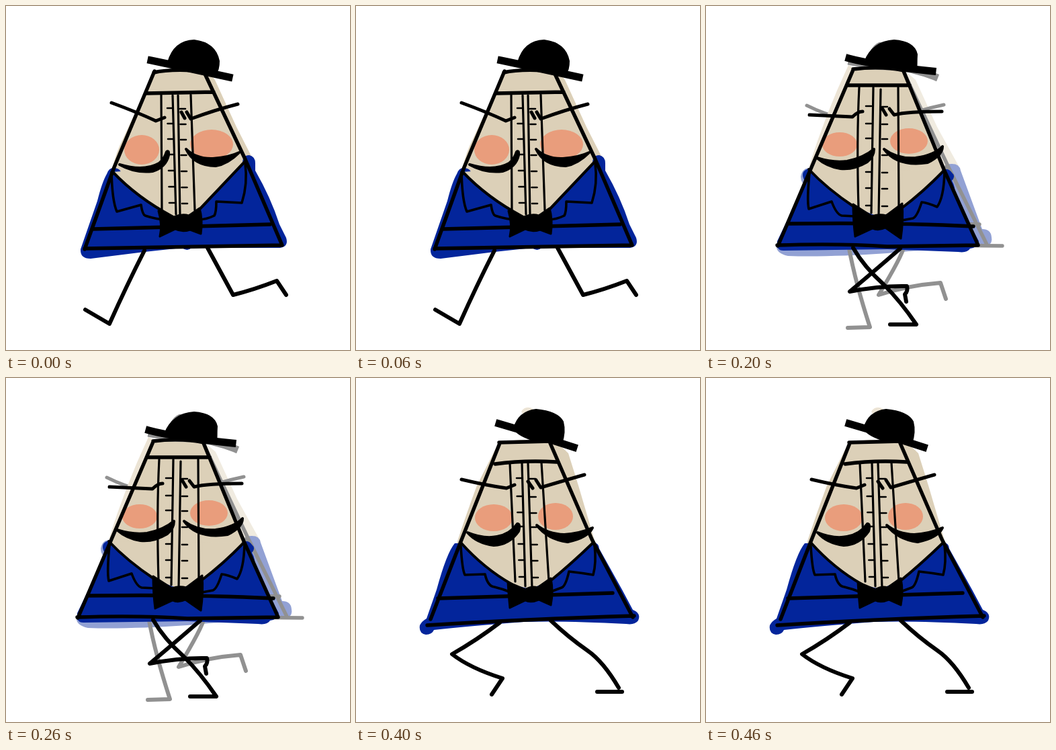
Recreate the animation shown at these times as an HTML page. Size 512x512 px, loop 0.5 s.

```html
<!DOCTYPE html>
<html lang="en">
<head>
<meta charset="utf-8">
<title>Running metronome</title>
<style>
html, body { margin: 0; width: 100%; height: 100%; overflow: hidden; background: #fff; }
svg { display: block; width: 100vw; height: 100vh; }
path { stroke-linecap: round; stroke-linejoin: round; }
</style>
</head>
<body>
<svg id="stage" viewBox="0 0 512 512"></svg>
<script>
const SKIN = '#dcd0b8', COAT = '#03259b', BLUSH = '#e99d7c', INK = '#000';
const STEP = 100;

// ticks: left x, right x, drift of the columns from top to bottom
const poses = [
  {
    skin: 'M220 99L272 94L303 100L311 110L343 180L366 225L352 240L280 314L235 308L158 242Q165 215 174 198Z',
    coat: 'M160 241Q173 241 173 256L240 285L285 285L352 234Q352 222 362 222Q371 224 371 234V245Q394 285 407 325L417 345Q421 358 408 360H276Q270 366 262 360L206 366L126 376Q110 376 111 362L136 290Q143 262 150 250Q153 241 160 241Z',
    cheeks: [[202, 214, 26, 22], [306, 206, 32, 22]],
    frame: 'M221 97L161 240L117 362M220 99Q245 93 296 97M296 101L356 228L411 356M117 361L411 356M208 130L309 128M129 332Q260 328 393 325',
    scale: 'M231 131L232 305M248 133L253 310M256 133L259 312M275 132L281 304',
    ticks: [240, 258, 3], tickY: [153, 176, 199, 222, 246, 270, 294],
    neck: 'M159 247Q195 285 247 313 M282 309Q317 272 355 232',
    lapels: 'M157 247Q158 290 165 306L201 296Q203 310 207 312Q225 318 240 318M356 234Q360 265 351 293L313 291Q313 307 310 312Q298 318 285 318',
    bow: 'M227 305L250 314Q262 309 272 312L288 301Q293 318 290 339L274 333Q262 337 252 332L229 343Q233 325 227 305Z',
    tache: 'M169 236Q205 247 228 234Q236 227 239 217Q243 214 242 222Q238 240 218 246Q192 249 169 236ZM268 213Q283 228 308 227Q333 225 347 218Q330 235 312 238Q280 238 268 213Z',
    brows: 'M157 144Q195 158 223 171L236 166M345 146Q310 155 275 168L269 158M261 158L266 167',
    brim: 'M216 81L240 86L332 106',
    dome: 'M241 84Q250 52 280 51Q312 55 317 82Q317 95 312 101L241 84Z',
    legs: 'M206 364Q180 415 154 473L118 452M300 360L338 430Q370 422 403 409L417 430'
  },
  {
    skin: 'M220 98L230 90L297 97L312 110L344 180L376 238L340 270L280 312L240 312L160 242L180 190Z',
    coat: 'M155 241Q170 243 172 255L240 285L290 285L358 236Q377 232 379 245L411 332Q424 332 425 344Q427 353 419 357Q330 362 270 368Q180 374 122 372Q104 368 105 357Q108 345 125 320L150 268Q141 264 141 254Q143 241 155 241Z',
    cheeks: [[199, 216, 25, 20], [308, 205, 29, 21]],
    frame: 'M220 101L160 241L111 356M218 98L270 94L296 97M295 100L360 238L418 355M111 356Q250 354 441 357M212 125L296 124M130 324Q270 322 407 325',
    scale: 'M230 126Q226 200 231 300M249 126L250 310M261 126Q262 220 260 312M284 124Q287 200 286 300',
    ticks: [238, 263, 2], tickY: [152, 177, 200, 222, 246, 273, 295],
    neck: 'M157 243Q185 270 228 303 M289 303Q335 270 358 238',
    lapels: 'M157 246Q152 290 154 303Q160 308 170 306Q185 295 199 293Q202 312 210 315L224 318M358 240Q354 290 349 293Q325 290 308 296Q308 305 303 312L290 318',
    bow: 'M221 298L245 313Q258 309 272 311L294 299Q296 320 292 345L273 330Q258 335 247 332L223 344Q222 320 221 298Z',
    tache: 'M166 235Q190 242 211 239Q230 232 246 214Q247 226 238 235Q215 252 195 250Q178 245 166 235ZM270 213Q290 228 313 228Q335 226 348 220Q340 234 318 239Q287 239 270 213Z',
    brows: 'M150 148Q178 162 203 167L214 177Q222 175 224 170L232 165M354 147Q315 155 280 170L273 160M261 163L268 172',
    brim: 'M217 83Q245 88 270 88Q310 93 340 105',
    dome: 'M241 90Q242 62 258 55Q282 52 300 58Q315 67 314 92Z',
    legs: 'M213 361Q222 410 244 478L211 479M295 357Q292 372 257 430Q300 416 349 412L357 436'
  },
  {
    glow: 'M212 88L220 92L165 226L153 240Q178 160 212 88Z',
    skin: 'M220 94L292 96L352 242L290 308L240 310L157 242Z',
    coat: 'M150 243Q163 243 165 250L225 285L290 285L352 245Q360 240 366 248Q372 253 366 260Q372 270 370 283L406 350Q404 360 393 361Q389 368 375 366L270 362L115 364Q104 364 106 350L148 262Q139 248 150 243Z',
    cheeks: [[199, 206, 26, 18], [302, 201, 28, 19]],
    frame: 'M219 95L157 240L107 357M219 94Q260 89 295 96M294 97L354 243L405 356M106 356Q200 353 270 358L405 356M210 118H303M124 324Q280 322 398 328',
    scale: 'M228 121Q224 200 227 300M249 121L246 308M260 124L257 312M286 121L287 300',
    ticks: [238, 261, 0], tickY: [150, 176, 198, 222, 248, 272, 298],
    neck: 'M153 243Q180 272 222 300 M291 301Q323 277 354 245',
    lapels: 'M154 248Q150 290 153 302L187 291Q194 310 202 312L222 313M355 247Q354 285 344 299Q330 293 321 292Q314 314 308 316L292 319',
    bow: 'M219 295L247 313Q258 309 268 312L292 294Q294 318 290 346L267 330Q256 335 248 331L222 343Q219 320 219 295Z',
    tache: 'M165 226Q190 234 210 231Q235 226 250 213Q250 224 240 232Q220 244 200 242Q180 239 165 226ZM265 213Q285 228 312 226Q340 222 352 209Q352 222 330 233Q285 240 265 213Z',
    brows: 'M154 162L218 165Q226 157 233 157M351 157Q300 157 280 162L273 153M262 152L268 162',
    brim: 'M213 78Q250 88 337 97',
    dome: 'M236 83Q248 53 280 51Q310 53 314 72L313 92Z',
    legs: 'M219 360Q235 388 265 415Q290 440 313 474H274M289 361Q250 395 214 425Q260 416 299 417Q301 424 296 429L298 440'
  },
  {
    skin: 'M213 94L270 86L300 100L345 180L371 240L340 262L285 310L235 305L160 262L130 292Q140 245 160 205Z',
    coat: 'M152 248L165 250L235 285L290 285L358 238Q375 238 379 248L416 330Q427 335 425 346Q422 352 412 351L340 354Q328 361 318 356L267 357Q240 364 215 360L190 354L112 356Q105 345 113 338L122 336L148 272Z',
    cheeks: [[209, 209, 25, 20], [303, 198, 23, 19]],
    frame: 'M218 102L155 250L113 351M219 101L286 94M288 96Q345 215 428 363M108 354Q230 356 300 354L421 350M209 123L297 120M122 327Q250 319 362 323L408 325',
    scale: 'M229 124L231 300M247 122L252 308M258 122Q266 220 268 308M279 122Q284 200 281 302',
    ticks: [236, 257, 6], tickY: [152, 177, 201, 226, 250, 274, 294],
    neck: 'M160 246Q195 282 225 300 M296 298Q330 272 357 238',
    lapels: 'M153 252Q148 285 155 299Q165 303 176 298L204 289Q203 312 208 316L222 317M358 240Q362 265 356 294L308 295Q309 308 302 313',
    bow: 'M220 296L249 314Q258 309 268 311L297 295Q297 318 293 341L268 329Q256 334 247 331L227 342Q218 325 220 296Z',
    tache: 'M170 237Q195 242 219 237Q238 230 244 216Q248 220 243 230Q228 250 208 249Q185 246 170 237ZM271 213Q295 225 318 223Q340 217 352 205Q352 216 340 226Q325 238 308 236Q282 230 271 213Z',
    brows: 'M143 144Q190 164 226 172L236 162M352 146Q315 155 280 168Q276 164 271 155M262 162L268 172L272 168',
    brim: 'M214 64L240 73L328 109',
    dome: 'M240 76Q245 48 262 42Q280 38 300 48Q316 58 311 90Q305 98 292 95Z',
    legs: 'M291 357Q250 400 192 472V477M168 461L192 475M168 463L190 476M214 357L251 405L264 427Q310 397 328 386L344 404'
  },
  {
    glow: 'M246 50Q252 40 264 46L250 56Z',
    skin: 'M213 95L245 92L300 97L316 112L331 160L356 245L290 312L235 310L150 246Q165 200 180 160Z',
    coat: 'M152 246L160 250L235 285L290 285L350 246Q361 243 362 254L396 315L412 345Q425 350 420 361Q415 368 402 366Q310 361 250 363Q170 369 116 375Q113 382 104 382Q93 380 95 368Q98 362 105 358L120 315Q135 260 147 246Z',
    cheeks: [[205, 208, 28, 20], [297, 206, 26, 20]],
    frame: 'M214 97L155 246L111 359M213 96L290 94M289 97L351 240L412 356M106 368Q250 359 414 354M207 128Q250 122 299 125M122 328L382 320',
    scale: 'M229 127L237 303M247 127L252 310M256 127L262 312M276 126L287 302',
    ticks: [239, 258, 4], tickY: [150, 177, 201, 222, 248, 272, 297],
    neck: 'M157 246Q190 283 232 307 M288 303Q321 276 352 246',
    lapels: 'M156 250Q158 285 162 293L192 292Q196 310 206 311Q218 314 228 318M355 248Q358 275 353 293Q335 290 317 288Q312 310 306 312L290 318',
    bow: 'M226 304L252 315Q262 309 270 312L290 298Q294 318 290 338L272 330Q260 335 252 331L229 342Q227 322 226 304Z',
    tache: 'M166 230Q190 240 210 236Q230 232 240 217Q245 217 242 228Q228 248 205 249Q180 246 166 230ZM269 219Q285 232 310 233Q335 231 352 223Q345 238 315 244Q285 240 269 219Z',
    brows: 'M157 151Q195 160 224 164L236 159M340 144Q305 154 275 163L268 152M256 154L263 164',
    brim: 'M213 68L240 76L324 103',
    dome: 'M235 75Q242 50 268 47Q300 50 308 65Q312 80 306 98L262 92Q240 85 235 75Z',
    legs: 'M214 364Q180 390 143 411Q170 432 218 447L202 471M290 361Q315 385 345 406Q368 422 391 461M359 467H396'
  }
];

function add(parent, tag, attrs = {}) {
  const el = document.createElementNS('http://www.w3.org/2000/svg', tag);
  for (const k in attrs) el.setAttribute(k, attrs[k]);
  return parent.appendChild(el);
}

const line = (g, d, width, cap = 'round') =>
  add(g, 'path', { d, fill: 'none', stroke: INK, 'stroke-width': width, style: `stroke-linecap:${cap}` });

const shape = (g, d, fill, edge = 0) =>
  add(g, 'path', { d, fill, stroke: edge ? fill : 'none', 'stroke-width': edge });

function tickPath({ ticks: [left, right, drift], tickY }) {
  return tickY.map((y, i) => {
    const dx = drift * i / 6;
    return `M${left + dx} ${y - 1}h8M${right + dx + 1} ${y}h8`;
  }).join('');
}

function draw(g, p) {
  if (p.glow) shape(g, p.glow, '#ece4d5');
  shape(g, p.skin, SKIN);
  shape(g, p.coat, COAT);
  // the open collar, closed behind the bow
  shape(g, p.neck.replace(' M', 'L258 314L') + 'Z', SKIN);
  for (const [cx, cy, rx, ry] of p.cheeks) add(g, 'ellipse', { cx, cy, rx, ry, fill: BLUSH });
  line(g, p.scale, 3.2);
  line(g, tickPath(p), 2.6);
  line(g, p.neck, 4);
  line(g, p.lapels, 3.6);
  line(g, p.frame, 5.4);
  line(g, p.legs, 6);
  line(g, p.brows, 5);
  shape(g, p.tache, INK, 4);
  shape(g, p.bow, INK, 3);
  line(g, p.brim, 11, 'square');
  shape(g, p.dome, INK, 2);
}

const stage = document.getElementById('stage');
const loop = STEP * poses.length;

poses.forEach((pose, i) => {
  const g = add(stage, 'g');
  // the third pose keeps a faint trail of the one before it
  if (i === 2) draw(add(g, 'g', { opacity: 0.43 }), poses[1]);
  draw(g, pose);
  g.animate([
    { opacity: 1, offset: 0, easing: 'step-end' },
    { opacity: 0, offset: STEP / loop },
    { opacity: 0, offset: 1 }
  ], { duration: loop, iterations: Infinity, delay: i * STEP - loop });
});
</script>
</body>
</html>
```
